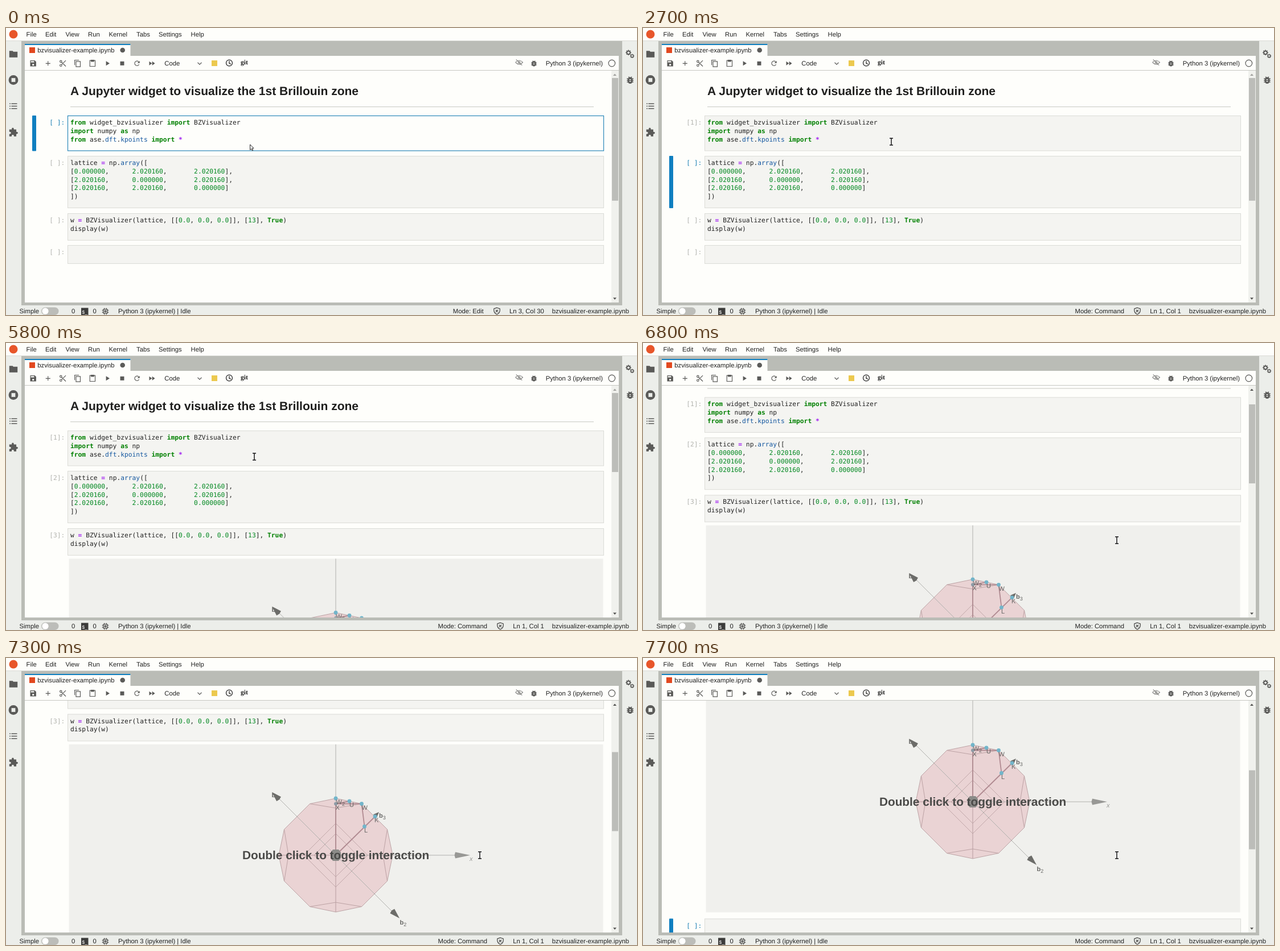
Recreate the animation shown at these times as an HTML page with a canvas. Size 1108 by 505 pixels, loop 8000 ms.

```html
<!DOCTYPE html>
<html lang="en">
<head>
<meta charset="utf-8">
<title>Notebook widget demo</title>
<style>
html, body { margin: 0; width: 100%; height: 100%; overflow: hidden; background: #fefefb; }
canvas { display: block; width: 1108px; height: 505px; }
</style>
</head>
<body>
<canvas id="stage" width="1108" height="505"></canvas>
<script>
const ctx = document.getElementById('stage').getContext('2d');
ctx.textRendering = 'geometricPrecision';
const LOOP = 8000, STEP = 100;
const PAPER = '#fefefb', SIDE = '#eceeea', DOCK = '#babcb6', BLUE = '#0f7fc0';
const INK = '#212121', ICON = '#5a5a58';
const SANS = '"Liberation Sans", Arial, sans-serif';
const UI = '11.27px ' + SANS;
const MONO = '11.27px "DejaVu Sans Mono", monospace';
const CHAR = 6.785, ROW = 14.74, LEAD = 15.6, TOP = 75, BOTTOM = 483, CODE_X = 113;

const CELLS = [
  { top: 154.5, h: 61.5, code: [
    'from widget_bzvisualizer import BZVisualizer',
    'import numpy as np',
    'from ase.dft.kpoints import *'] },
  { top: 225.5, h: 91, code: [
    'lattice = np.array([',
    '[0.000000,      2.020160,       2.020160],',
    '[2.020160,      0.000000,       2.020160],',
    '[2.020160,      2.020160,       0.000000]',
    '])'] },
  { top: 326.5, h: 47, code: [
    'w = BZVisualizer(lattice, [[0.0, 0.0, 0.0]], [13], True)',
    'display(w)'] },
  { top: 382.5, h: 32, code: [] }
];
const KEYWORDS = ['from', 'import', 'as', 'True'];

// Prompt timeline per cell: [start, end]
const RUNS = [[2300, 2700], [3300, 3900], [4600, 5800]];
const SCROLL = [[6700, 0], [7000, 176], [7100, 176], [7300, 227.5], [7700, 321.5]];
const POINTER = [[0, 432, 207], [500, 434, 203], [600, 436, 200], [6400, 488, 228],
  [6500, 557, 264], [6700, 832, 347]];

// Icon outlines on a 24 unit grid: f = fill, s = stroke
const ICONS = {
  save: { f: 'M3 3H17L21 7V21H3ZM5 5V9H15V5ZM9 16a3 3 0 1 0 6 0a3 3 0 1 0-6 0Z' },
  add: { s: 'M5 12H19M12 5V19' },
  cut: { s: 'M3 6a3 3 0 1 0 6 0a3 3 0 1 0-6 0M3 18a3 3 0 1 0 6 0a3 3 0 1 0-6 0M8 8L21 21M8 16L21 3' },
  copy: { s: 'M3 17V2H16M7 6H20V22H7Z' },
  paste: { s: 'M4 3H20V21H4Z', f: 'M7 1H17V7H7Z' },
  run: { f: 'M8 5V19L19 12Z' },
  stop: { f: 'M6 6H18V18H6Z' },
  refresh: { s: 'M18.2 15A7 7 0 1 1 17 7', f: 'M13 11H20V4Z' },
  forward: { f: 'M4 18L12.5 12L4 6ZM13 6V18L21.5 12Z' },
  chevron: { s: 'M6 9L12 15L18 9' },
  clock: { s: 'M3 12a9 9 0 1 0 18 0a9 9 0 1 0-18 0M12 6V13L16.5 15.5' },
  bug: { f: 'M6 11a6 6 0 0 1 12 0v4a6 6 0 0 1-12 0ZM10 10v2h4v-2ZM10 14v2h4v-2Z',
    s: 'M4 9h3M4 13h3M4 17h3M17 9h3M17 13h3M17 17h3M8 4l3 3M16 4l-3 3' },
  folder: { f: 'M2 4H10L12 6H22V20H2Z' },
  list: { s: 'M7 6H21M7 12H21M7 18H21M2.5 6H5M2.5 12H5M2.5 18H5' },
  puzzle: { f: 'M2 5H8V3.5a2.5 2.5 0 0 1 5 0V5H19V11H20.5a2.5 2.5 0 0 1 0 5H19V22H13.2V20.5a2.7 2.7 0 0 0-5.4 0V22H2V16.2H3.5a2.7 2.7 0 0 0 0-5.4H2Z' },
  eye: { s: 'M1 12Q12 0 23 12Q12 24 1 12M9 12a3 3 0 1 0 6 0a3 3 0 1 0-6 0M3 3L21 21' },
  chip: { s: 'M6 6H18V18H6ZM10 10H14V14H10ZM9 2V6M15 2V6M9 18V22M15 18V22M2 9H6M2 15H6M18 9H22M18 15H22' },
  shield: { s: 'M12 2L21 5V11Q20 19 12 22Q4 19 3 11V5ZM8.5 8.5L15.5 15.5M15.5 8.5L8.5 15.5' }
};

function text(s, x, y, color = INK, font = UI) {
  ctx.font = font;
  ctx.fillStyle = color;
  ctx.fillText(s, x, y);
}

function rect(x, y, w, h, color) {
  ctx.fillStyle = color;
  ctx.fillRect(x, y, w, h);
}

function disc(x, y, r, color) {
  ctx.beginPath();
  ctx.arc(x, y, r, 0, 2 * Math.PI);
  ctx.fillStyle = color;
  ctx.fill();
}

function trace(points, closed) {
  ctx.beginPath();
  points.forEach(([x, y]) => ctx.lineTo(x, y));
  if (closed) ctx.closePath();
}

function line(points, color, width = 1, closed = false) {
  trace(points, closed);
  ctx.strokeStyle = color;
  ctx.lineWidth = width;
  ctx.stroke();
}

function poly(points, color) {
  trace(points, true);
  ctx.fillStyle = color;
  ctx.fill();
}

function icon(name, x, y, size = 13.9, color = ICON) {
  const { f, s } = ICONS[name], k = size / 24;
  ctx.save();
  ctx.translate(x - size / 2, y - size / 2);
  ctx.scale(k, k);
  ctx.fillStyle = ctx.strokeStyle = color;
  ctx.lineWidth = 2;
  if (f) ctx.fill(new Path2D(f), 'evenodd');
  if (s) ctx.stroke(new Path2D(s));
  ctx.restore();
}

function gear(x, y, r) {
  for (let i = 0; i < 8; i++) {
    const a = i * Math.PI / 4, c = Math.cos(a), s = Math.sin(a);
    line([[x, y], [x + c * r, y + s * r]], ICON, r * 0.38);
  }
  disc(x, y, r * 0.76, ICON);
  disc(x, y, r * 0.4, SIDE);
}

function scrollAt(t) {
  let [t0, y0] = SCROLL[0];
  if (t <= t0) return 0;
  for (const [t1, y1] of SCROLL) {
    if (t < t1) return y0 + (y1 - y0) * (t - t0) / (t1 - t0);
    [t0, y0] = [t1, y1];
  }
  return y0;
}

function codeLine(src, y) {
  const tokens = /\d+(?:\.\d+)?|[A-Za-z_]\w*|[^\s\w]/g;
  for (const m of src.matchAll(tokens)) {
    const s = m[0];
    let color = INK, bold = false;
    if (KEYWORDS.includes(s)) { color = '#008000'; bold = true; }
    else if (/^\d/.test(s)) color = '#008820';
    else if (s === '=' || s === '*') { color = '#a020f0'; bold = true; }
    else if (src[m.index - 1] === '.') color = '#1558a0';
    text(s, CODE_X + m.index * CHAR, y, color, (bold ? 'bold ' : '') + MONO);
  }
}

function drawCell(i, top, t, active) {
  const { h, code } = CELLS[i], on = i === active, edit = on && i === 0;
  rect(108.5, top, 941, h, edit ? PAPER : '#f4f4f1');
  ctx.strokeStyle = edit ? '#2b88ba' : '#dbdcd7';
  ctx.lineWidth = edit ? 1.2 : 1;
  ctx.strokeRect(108.5, top, 941, h);
  if (on) {
    ctx.fillStyle = BLUE;
    ctx.beginPath();
    ctx.roundRect(46, top - 0.5, 7, h + 1, 1);
    ctx.fill();
  }
  let mark = ' ';
  const run = RUNS[i];
  if (run && t >= run[0]) mark = t < run[1] ? '*' : String(i + 1);
  text(`[${mark}]:`, 76.2, top + LEAD, on ? '#1a80b4' : '#b2b3ae', MONO);
  code.forEach((src, n) => codeLine(src, top + LEAD + n * ROW));
}

function cone(x, y, angle, len, half, color) {
  ctx.save();
  ctx.translate(x, y);
  ctx.rotate(angle);
  poly([[0, 0], [-len, -half], [-len - 1.5, 0], [-len, half]], color);
  ctx.restore();
}

function label(s, x, y, sub, bold) {
  text(s, x, y, '#666664', (bold ? 'bold ' : '') + '11px ' + SANS);
  if (sub) text(sub, x + ctx.measureText(s).width, y + 3, '#666664', '9px ' + SANS);
}

function diamond(r) {
  return [[0, -r], [r, 0], [0, r], [-r, 0]];
}

function drawScene(cx, cy) {
  const axis = '#b0b0ad', edge = '#b79c9f', way = '#b08a91', dark = '#6c6c69';
  const half = Math.PI / 4;
  ctx.save();
  ctx.translate(cx, cy);
  ctx.lineJoin = 'round';

  const quarter = [[0, -100], [45.5, -90.5], [90.5, -45.5]];
  const hull = [0, 1, 2, 3].flatMap(n => quarter.map(([x, y]) => {
    for (let k = 0; k < n; k++) [x, y] = [-y, x];
    return [x, y];
  }));
  poly(hull, '#ead3d4');
  line(hull, edge, 0.9, true);
  for (const s of [-1, 1]) {
    line([[-45.5, s * 90.5], [0, s * 83], [45.5, s * 90.5]], edge, 0.9);
    line([[s * 90.5, -45.5], [s * 83, 0], [s * 90.5, 45.5]], edge, 0.9);
  }
  line(diamond(56), edge, 0.8, true);
  line(diamond(38), edge, 0.8, true);
  line([[0, 0], [0, 100]], edge);
  line([[-100, 0], [0, 0]], edge);

  line([[0, 0], [0, -195]], axis);
  line([[0, 0], [212, 0]], axis);
  line([[-100, -100], [100, 100]], axis);
  cone(236, 0, 0, 26, 5.5, '#989895');

  const G = [0, 0], X = [0, -90.5], W = [45.5, -90.5], L = [50.5, -50.5];
  const K = [69, -68], U = [24, -95], W2 = [0, -100];
  line([G, X, W, L], way, 1.8);
  line([G, K], way, 1.8);
  line([X, U], way, 1.8);

  label('b', -112.5, -102, '', true);
  cone(-112, -111, -3 * half, 17, 5.5, dark);
  cone(112, 111, half, 18, 5.5, dark);
  cone(76, -76, -half, 10, 4, dark);
  label('b', 112.5, 122, '2', true);
  label('b', 76, -66, '3', true);
  text('x', 235, 10, '#989895', 'italic 11px ' + SANS);

  poly([[-5, -10], [5, -10], [9, -5], [9, 5], [5, 10], [-5, 10], [-9, 5], [-9, -5]], '#8b8b88');
  for (const p of [W2, U, W, K, L]) disc(p[0], p[1], 3.4, '#72b5ca');
  disc(X[0], X[1], 3, '#8d9ba6');
  label('W', 0.5, -90, '2');
  label('X', -0.5, -80.5);
  label('U', 24, -85);
  label('W', 45.5, -80);
  label('L', 50, -40);
  label('K', 68, -58);
  ctx.restore();

  ctx.textAlign = 'center';
  text('Double click to toggle interaction', cx, cy + 7, '#4a4a48', 'bold 20.8px ' + SANS);
  ctx.textAlign = 'left';
}

function drawNotebook(t) {
  const scroll = scrollAt(t), output = t >= 4800;
  const active = RUNS.filter(run => t >= run[0]).length;
  rect(33, TOP, 1043, BOTTOM - TOP, PAPER);
  ctx.save();
  ctx.beginPath();
  ctx.rect(33, TOP, 1030, BOTTOM - TOP);
  ctx.clip();
  ctx.translate(0, -scroll);
  text('A Jupyter widget to visualize the 1st Brillouin zone', CODE_X, 118, '#1f1f1e', 'bold 21.02px ' + SANS);
  rect(CODE_X, 138, 919, 1.2, '#cfd0cb');
  CELLS.forEach((cell, i) => drawCell(i, i === 3 && output ? 780.5 : cell.top, t, active));
  if (output) {
    rect(110.5, 379.5, 938, 389.5, '#f0f0ed');
    if (t >= 4900) drawScene(579, 574.5);
  }
  const blinkOn = t >= 700 && t < 1300 || t >= 1800 && t < 2300;
  if (blinkOn) rect(309.5, 188.5, 1.2, 15, '#000');
  ctx.restore();

  const span = 382, total = output ? 1121 : 722;
  rect(1063, TOP, 13, BOTTOM - TOP, '#f0f1ed');
  rect(1064, 88 + scroll * span / total, 11, 408 * span / total, '#bcbdb9');
  poly([[1066, 84], [1072, 84], [1069, 80.5]], scroll ? '#50504e' : '#a0a09d');
  poly([[1066, 474.5], [1072, 474.5], [1069, 478]], '#50504e');
}

function drawFrame() {
  rect(0, 0, 1108, 505, SIDE);
  rect(0, 0, 1108, 22, PAPER);
  rect(0, 22, 1108, 1, '#d9dad5');
  rect(27, 23, 1055, 465, DOCK);
  rect(33, 49, 1043, 26, PAPER);
  rect(33, 28, 185.5, 21, PAPER);
  rect(33, 28, 185.5, 2, BLUE);

  disc(13, 11, 7.5, '#e8562a');
  [['File', 35.5], ['Edit', 69], ['View', 104.5], ['Run', 144], ['Kernel', 180.5],
    ['Tabs', 229], ['Settings', 268], ['Help', 324.5]].forEach(([s, x]) => text(s, x, 15.2));
  rect(41, 34, 10, 10, '#e2481f');
  text('bzvisualizer-example.ipynb', 55.3, 43);
  disc(204.7, 39, 4.3, '#5c5c5a');

  icon('folder', 13, 46, 17.3);
  disc(13, 91.5, 8.4, ICON);
  rect(9.6, 88.1, 6.8, 6.8, SIDE);
  icon('list', 13, 137.5, 17.3);
  icon('puzzle', 13, 183.5, 17.3);
  gear(1093, 43.3, 4.8);
  gear(1099.5, 49.3, 3.7);
  icon('bug', 1096, 91.5, 17.3);
}

function drawToolbar(busy) {
  ['save', 'add', 'cut', 'copy', 'paste', 'run', 'stop', 'refresh', 'forward']
    .forEach((name, i) => icon(name, 47.7 + i * 26.05, 62.3));
  text('Code', 278.3, 66);
  icon('chevron', 340, 62.5);
  rect(361, 57, 10, 10, '#ecc94f');
  icon('clock', 392, 61.5, 14.5, '#1c1c1c');
  text('git', 412, 64, '#1c1c1c', 'bold 11.5px "Liberation Serif", serif');
  icon('eye', 901, 60.5, 13.9, '#8a8a88');
  icon('bug', 927, 62.3);
  text('Python 3 (ipykernel)', 947.7, 66);
  ctx.beginPath();
  ctx.arc(1063.8, 62, 5.8, 0, 2 * Math.PI);
  ctx.strokeStyle = ctx.fillStyle = ICON;
  ctx.lineWidth = 1.2;
  ctx.stroke();
  if (busy) ctx.fill();
  rect(33, 74, 1043, 1, '#c6c7c2');
}

function drawStatus(edit, busy) {
  const y = 502.4;
  text('Simple', 23.5, y);
  ctx.fillStyle = '#bcbdb9';
  ctx.beginPath();
  ctx.roundRect(62, 491.5, 30.5, 13.5, 6.7);
  ctx.fill();
  disc(69, 498.2, 5.6, '#fff');
  text('0', 115, y);
  rect(132, 492.5, 12.5, 12.5, '#3c3c3b');
  text('$_', 133.5, 502.5, '#fff', '8.5px ' + SANS);
  text('0', 152.5, y);
  icon('chip', 174.5, 498.5, 13.9, '#3c3c3b');
  text('Python 3 (ipykernel) | ' + (busy ? 'Busy' : 'Idle'), 197, y);
  text(edit ? 'Mode: Edit' : 'Mode: Command', edit ? 784.8 : 758.5, y);
  icon('shield', edit ? 862 : 868, 498, 13.9, '#3c3c3b');
  ctx.textAlign = 'right';
  text(edit ? 'Ln 3, Col 30' : 'Ln 1, Col 1', 944.8, y);
  ctx.textAlign = 'left';
  text('bzvisualizer-example.ipynb', 958.8, y);
}

function drawPointer(t) {
  if (t < 200) {
    const arrow = [[428.6, 205], [428.6, 214.5], [430.8, 212.6], [432.4, 215.8],
      [433.8, 215], [432.2, 211.9], [435, 211.6]];
    poly(arrow, '#fff');
    line(arrow, '#222', 1, true);
    return;
  }
  const [, x, y] = POINTER.filter(p => p[0] <= t).pop();
  for (const [color, width] of [['#fff', 3.4], ['#111', 1.5]]) {
    line([[x, y - 6], [x, y + 6]], color, width);
    for (const s of [-6, 6]) line([[x - 3, y + s], [x + 3, y + s]], color, width);
  }
}

function render(now) {
  const t = Math.floor(now % LOOP / STEP) * STEP;
  const busy = t >= 2400 && t < 2700 || t >= 4800 && t < 5800;
  drawFrame();
  drawNotebook(t);
  drawToolbar(busy);
  drawStatus(t < 2300, busy);
  drawPointer(t);
}

let start;
function tick(now) {
  start ??= now;
  render(now - start);
  requestAnimationFrame(tick);
}
render(0);
requestAnimationFrame(tick);
</script>
</body>
</html>
```
